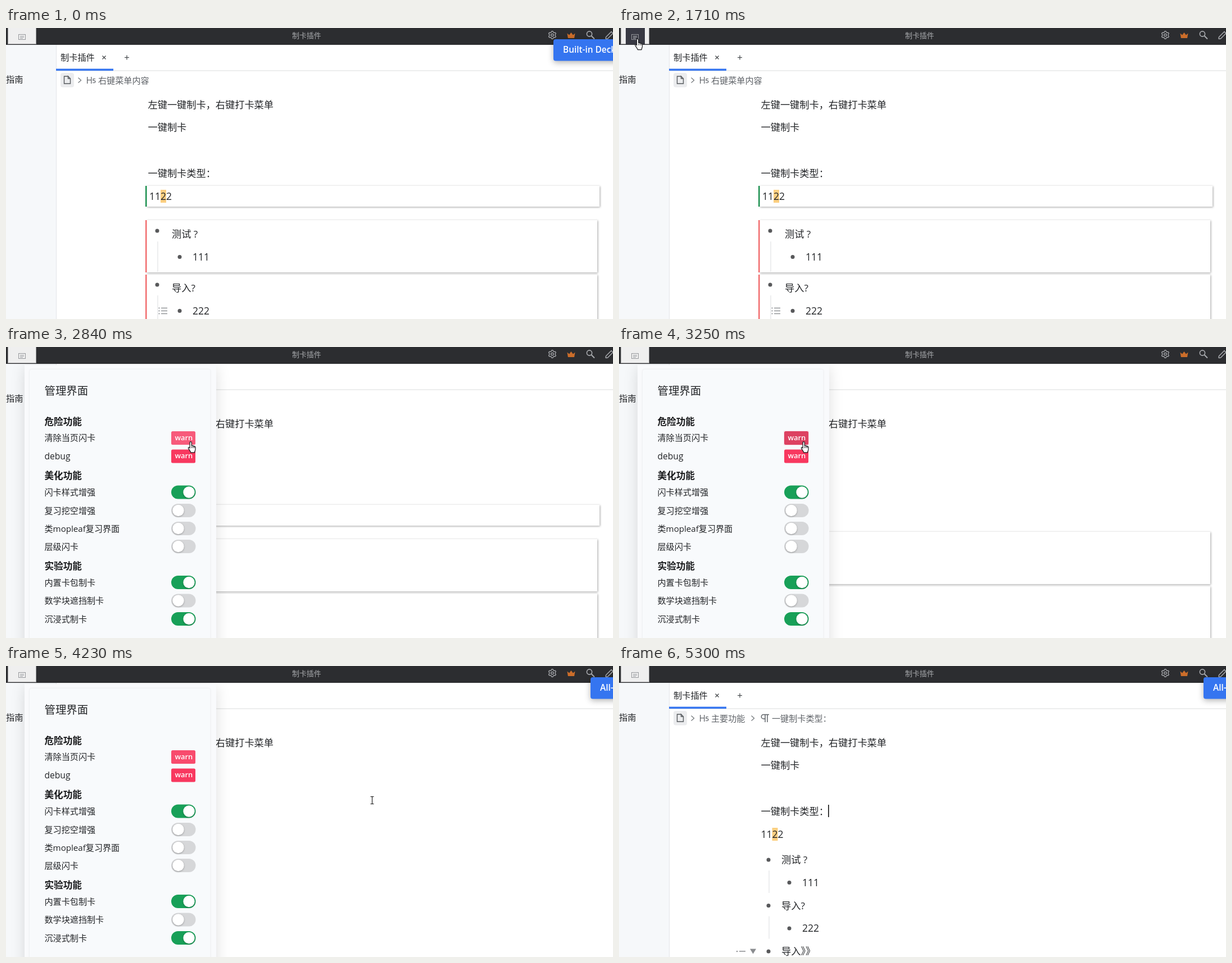
Write an HTML page with a canvas that moves like this. It is 1080 px wide and 518 px high and loops after 5770 ms.

```html
<!DOCTYPE html>
<html lang="zh-CN">
<head>
<meta charset="utf-8">
<title>制卡插件</title>
<style>
html, body { margin: 0; width: 100%; height: 100%; overflow: hidden; background: #fff; }
canvas { display: block; width: 100%; height: 100%; }
</style>
</head>
<body>
<canvas id="stage" width="1080" height="518"></canvas>
<script>
const LOOP = 5770;
const FONT = '"Open Sans", "Noto Sans CJK SC", "Noto Sans CJK", sans-serif';
const BLUE = '#3575f0', GREEN = '#18a058', INK = '#222427', GREY = '#5f6368';
const ctx = document.getElementById('stage').getContext('2d');
ctx.fontKerning = 'none';

const HAND = new Path2D('M3.5 2.2a1.6 1.6 0 0 1 3.2 0V8c.3-1 2.4-.9 2.6.6c.4-.9 2.1-.7 2.3.7c.5-.6 1.9-.4 1.9 1V14c0 2-1.2 3-1.4 5.8H5.2C5 17.5 2.5 15.5.9 12.2c-.5-1.2 1-2.2 2-1l.6.9z');
const ARROW = new Path2D('M0 0V16l3.8-3.6 2.6 5.8 2.4-1.1-2.6-5.6H11.2z');
const CROWN = new Path2D('M-7-4.5l3.6 3L0-6l3.4 4.5 3.6-3L5.6 4h-11.2z');
const PILCROW = new Path2D('M15-6.5H5A3.7 3.7 0 0 0 5 .9H8M8-6.5V7M12-6.5V7');

// Text is placed by its left edge and the vertical middle of its line.
function text(str, x, y, size, color = INK, weight = 400) {
  ctx.font = `${weight} ${size}px ${FONT}`;
  ctx.fillStyle = color;
  ctx.fillText(str, x, y + size * 0.34);
}

function rect(x, y, w, h, color) {
  ctx.fillStyle = color;
  ctx.fillRect(x, y, w, h);
}

function rounded(x, y, w, h, r, color) {
  ctx.fillStyle = color;
  ctx.beginPath();
  ctx.roundRect(x, y, w, h, r);
  ctx.fill();
}

function dot(x, y, r, color) {
  ctx.fillStyle = color;
  ctx.beginPath();
  ctx.arc(x, y, r, 0, Math.PI * 2);
  ctx.fill();
}

function line(points, color, width = 1) {
  ctx.strokeStyle = color;
  ctx.lineWidth = width;
  ctx.beginPath();
  points.forEach(([x, y], i) => i ? ctx.lineTo(x, y) : ctx.moveTo(x, y));
  ctx.stroke();
}

function at(x, y, draw) {
  ctx.save();
  ctx.translate(x, y);
  draw();
  ctx.restore();
}

function shadowed(color, blur, dx, dy, draw) {
  ctx.save();
  ctx.shadowColor = color;
  ctx.shadowBlur = blur;
  ctx.shadowOffsetX = dx;
  ctx.shadowOffsetY = dy;
  draw();
  ctx.restore();
}

// Progress in n equal jumps, the first at `from`, the last at `to`.
function jumps(t, from, to, n) {
  if (t < from) return 0;
  const i = Math.floor((t - from) / (to - from) * (n - 1) + 0.001) + 1;
  return Math.min(i, n) / n;
}

const mix = (a, b, p) => a + (b - a) * p;

function gear() {
  ctx.strokeStyle = '#a9abaf';
  ctx.lineWidth = 1.3;
  ctx.beginPath();
  for (let i = 0; i <= 48; i++) {
    const a = i / 48 * Math.PI * 2;
    const r = 6 + 0.9 * Math.tanh(3 * Math.cos(6 * a));
    ctx.lineTo(Math.sin(a) * r, -Math.cos(a) * r);
  }
  ctx.closePath();
  ctx.stroke();
  ctx.beginPath();
  ctx.arc(0, 0, 2.2, 0, 7);
  ctx.stroke();
}

function topBar(t) {
  rect(0, 0, 1080, 30, '#2c2d30');
  rect(3, 0, 51, 29, '#9b9b9d');
  rect(4, 0, 49, 28, '#efefef');
  if (t >= 1710 && t < 2310) rect(12, 0, 34, 29, '#383943');
  ctx.strokeStyle = '#96989c';
  ctx.lineWidth = 1;
  ctx.strokeRect(22.5, 11.5, 12, 9);
  for (const y of [14.5, 16.5, 18.5]) line([[25, y], [y > 18 ? 30 : 32, y]], '#a6a8ac');
  text('制卡插件', 509, 13.5, 12.9, '#a8aaad');
  at(972, 12.5, gear);
  at(1005.5, 14, () => { ctx.fillStyle = '#cb6d2a'; ctx.fill(CROWN); });
  ctx.strokeStyle = '#a9abaf';
  ctx.lineWidth = 1.6;
  ctx.beginPath();
  ctx.arc(1038, 10.5, 4.6, 0, 7);
  ctx.stroke();
  line([[1041.5, 14], [1047, 19.5]], '#a9abaf', 1.9);
  line([[1067, 19.5], [1067.5, 16], [1077, 6.5], [1080, 9.5], [1070.5, 19], [1067, 19.5]], '#a9abaf', 1.5);
}

function chevron(x) {
  line([[x - 2.5, 88.5], [x + 2.5, 93], [x - 2.5, 97.5]], '#7c8084', 1.4);
}

function breadcrumb(edited) {
  rounded(97, 80, 24, 25.5, 4, '#ebecee');
  line([[110.5, 86], [103.5, 86], [103.5, 99], [114.5, 99], [114.5, 90], [110.5, 86], [110.5, 90], [114.5, 90]], '#54585c', 1.4);
  chevron(131);
  text('H', 142.5, 93.5, 15.5, GREY, 500);
  text('5', 153.5, 94.5, 11.5, GREY, 600);
  text(edited ? '主要功能' : '右键菜单内容', 164, 93.5, 15.1, GREY);
  if (!edited) return;
  chevron(238);
  at(252, 93, () => {
    ctx.strokeStyle = GREY;
    ctx.lineWidth = 1.5;
    ctx.stroke(PILCROW);
  });
  text('一键制卡类型：', 272, 93.5, 15.1, GREY);
}

function card(y, w, h, color) {
  shadowed('rgba(0,0,0,.36)', 3.5, 1, 1, () => rect(250, y, w, h, '#fff'));
  rect(248, y, 2.5, h, color);
}

function cloze(x) {
  rect(x + 20, 288, 10, 23, '#fbcf81');
  text('1122', x, 300, 17.5);
}

function list(x, y, head, child, inCard) {
  const lift = inCard ? 6 : 0;
  dot(x, y - lift, 3.5, '#58595b');
  text(head, x + (inCard ? 26 : 23), y + 0.5, 17.2);
  if (!child) return;
  rect(x + 0.5, y + (inCard ? 13 : 19), 1, inCard ? 54 : 40, '#dcdddf');
  dot(x + (inCard ? 40 : 37), y + 40.5, 3.5, '#58595b');
  text(child, x + (inCard ? 63 : 60), y + 41, 17.5);
}

function plainRows(t) {
  cloze(252.5);
  list(266, 345, '测试 ?', '111');
  list(266, 426.5, '导入?', '222');
  list(266, 508, '导入》》');
  if (t < 4780) return;
  dot(210, 508, 1.2, '#8a8c8f');
  rect(214, 507, 11, 1.5, '#8a8c8f');
  ctx.fillStyle = '#8a8c8f';
  ctx.beginPath();
  ctx.moveTo(233, 503.5);
  ctx.lineTo(244, 503.5);
  ctx.lineTo(238.5, 512.5);
  ctx.fill();
}

function cardRows(t) {
  const red = '#f16c6e';
  const shift = t >= 3250 ? -13 : 0;
  if (!shift) {
    card(281, 806, 37, '#1a8f4f');
    cloze(255);
  }
  if (t < 3390) {
    card(342 + shift, 802, 93, red);
    list(269, 367 + shift, '测试 ?', '111', true);
  }
  const y = t < 3390 ? 439 + shift : 411;
  card(y, 802, 93, red);
  list(269, y + 24, '导入?', '222', true);
  if (shift) return;
  for (const dy of [498.5, 503.5, 508.5]) {
    dot(272.5, dy, 1.1, '#8c8f93');
    rect(276, dy - 0.7, 11, 1.4, '#8c8f93');
  }
}

function page(t) {
  const edited = t >= 4300;
  rect(0, 30, 1080, 488, '#fff');
  rect(0, 30, 89, 488, '#f6f8fa');
  rect(89, 30, 1, 488, '#e4e6e8');
  rect(90, 75.5, 990, 1, '#dcddde');
  text('指南', 0, 92, 15.3);
  text('制卡插件', 97, 53, 15.2);
  line([[171.5, 49.5], [177.5, 55.5]], '#44474a', 1.3);
  line([[177.5, 49.5], [171.5, 55.5]], '#44474a', 1.3);
  line([[211, 52.5], [219, 52.5]], '#44474a', 1.2);
  line([[215, 48.5], [215, 56.5]], '#44474a', 1.2);
  rect(89, 72.5, 102, 3.5, BLUE);
  breadcrumb(edited);
  text('左键一键制卡，右键打卡菜单', 252.5, 137, 17.2);
  text('一键制卡', 252.5, 177, 17.2);
  text('一键制卡类型：', 252.5, 259, 17.2);
  if (t < 3550) cardRows(t); else plainRows(t);
  if (edited && (t < 4800 || t >= 5300)) rect(372, 247, 1.6, 22, '#111');
}

function warnColor(t) {
  if (t < 2840) return '#f8385f';
  if (t < 3170) return '#f75a7b';
  if (t < 3310) return '#dd4161';
  if (t < 3780) return '#f75a7b';
  return '#f84b6d';
}

function warnButton(y, color) {
  rounded(294, y - 12, 43, 24, 2.5, color);
  text('warn', 300.5, y - 0.5, 12.9, '#fff', 600);
}

function toggle(y, on) {
  rounded(294, y - 12, 43.5, 24, 12, on ? GREEN : '#d6d7d9');
  shadowed('rgba(0,0,0,.3)', 3, 0, 1, () => dot(on ? 325.5 : 306.5, y, 10.2, '#fff'));
}

function panel(t) {
  const alpha = t < 1970 ? 0 : 1 - jumps(t, 4300, 4440, 3);
  if (!alpha) return;
  ctx.save();
  ctx.globalAlpha = alpha;
  ctx.beginPath();
  ctx.rect(0, 30, 1080, 488);
  ctx.clip();
  shadowed('rgba(0,0,0,.13)', 24, 0, 4, () => rect(33, 32, 341, 520, '#f9fafc'));
  shadowed('rgba(0,0,0,.1)', 3, 0, 0, () => rounded(42, 40, 321.5, 500, 3, '#f8fafc'));
  text('管理界面', 68.5, 78, 19.4);
  text('危险功能', 68.5, 133, 16.6, '#18191b', 700);
  text('清除当页闪卡', 68.5, 162, 15.1);
  text('debug', 68.5, 195, 15.6);
  warnButton(162, warnColor(t));
  warnButton(194.5, '#f8385f');
  if (t >= 3170 && t < 3710) {
    const p = jumps(t, 3170, 3600, 6);
    ctx.strokeStyle = `rgba(248,56,95,${0.4 * (1 - p)})`;
    ctx.lineWidth = 3 * p;
    ctx.strokeRect(294 - 1.5 * p, 150 - 1.5 * p, 43 + 3 * p, 24 + 3 * p);
  }
  text('美化功能', 68.5, 229.5, 16.6, '#18191b', 700);
  text('实验功能', 68.5, 390.5, 16.6, '#18191b', 700);
  [
    ['闪卡样式增强', 258.5, true],
    ['复习挖空增强', 291, false],
    ['类mopleaf复习界面', 323, false],
    ['层级闪卡', 355, false],
    ['内置卡包制卡', 419, true],
    ['数学块遮挡制卡', 451.5, false],
    ['沉浸式制卡', 484, true]
  ].forEach(([label, y, on]) => {
    text(label, 68.5, y + 0.5, 15.1);
    toggle(y, on);
  });
  ctx.restore();
}

function toast(t) {
  let x, label;
  if (t < 2000) {
    x = mix(974, 1090, jumps(t, 130, 370, 4));
    label = 'Built-in Deck';
  } else {
    x = mix(1090, 1040, jumps(t, 3780, 3900, 3));
    label = 'All-';
  }
  if (x > 1088) return;
  shadowed('rgba(0,0,0,.3)', 11, 0, 3, () => rounded(x, 20, 140, 38.5, 4, BLUE));
  text(label, x + 17, 39, 15.4, '#fff', 600);
}

function beam(x, y) {
  line([[x, y - 6], [x, y + 6]], '#222', 1.2);
  for (const d of [-6.5, 6.5]) line([[x - 3, y + d], [x + 3, y + d]], '#222', 1.1);
}

function pointer(path, x, y) {
  at(x, y, () => {
    ctx.fillStyle = '#fff';
    ctx.strokeStyle = '#16171a';
    ctx.lineWidth = 1.2;
    ctx.lineJoin = 'round';
    ctx.fill(path);
    ctx.stroke(path);
    if (path === HAND) {
      for (const lx of [6.7, 9.3, 11.6]) line([[lx, 9], [lx, 12]], '#16171a', 0.9);
    }
  });
}

// [first jump, last jump, jumps, x0, y0, x1, y1]
const MOVES = [
  [130, 680, 8, 970, 536, 328, 219],
  [750, 1020, 5, 328, 219, 28, 26],
  [1300, 1490, 4, 28, 26, 32, 20],
  [1710, 1790, 2, 28, 18, 28, 19.5],
  [2310, 2700, 7, 28, 20, 323.5, 168],
  [3780, 3900, 3, 325, 173, 651.5, 239],
  [4440, 4710, 5, 651.5, 239, 906, 509],
  [4780, 5000, 4, 906, 509, 1022, 490]
];

function cursor(t) {
  if (t < 130 || t >= 5070) return;
  const [from, to, n, x0, y0, x1, y1] = MOVES.filter(m => t >= m[0]).pop();
  const p = jumps(t, from, to, n);
  const x = mix(x0, x1, p), y = mix(y0, y1, p);
  if (t < 1710 || t >= 3780) beam(x, y);
  else pointer(t >= 2310 && t < 2700 ? ARROW : HAND, x, y);
}

function frame(now) {
  const t = now % LOOP;
  page(t);
  topBar(t);
  panel(t);
  toast(t);
  cursor(t);
  requestAnimationFrame(frame);
}

requestAnimationFrame(frame);
</script>
</body>
</html>
```
